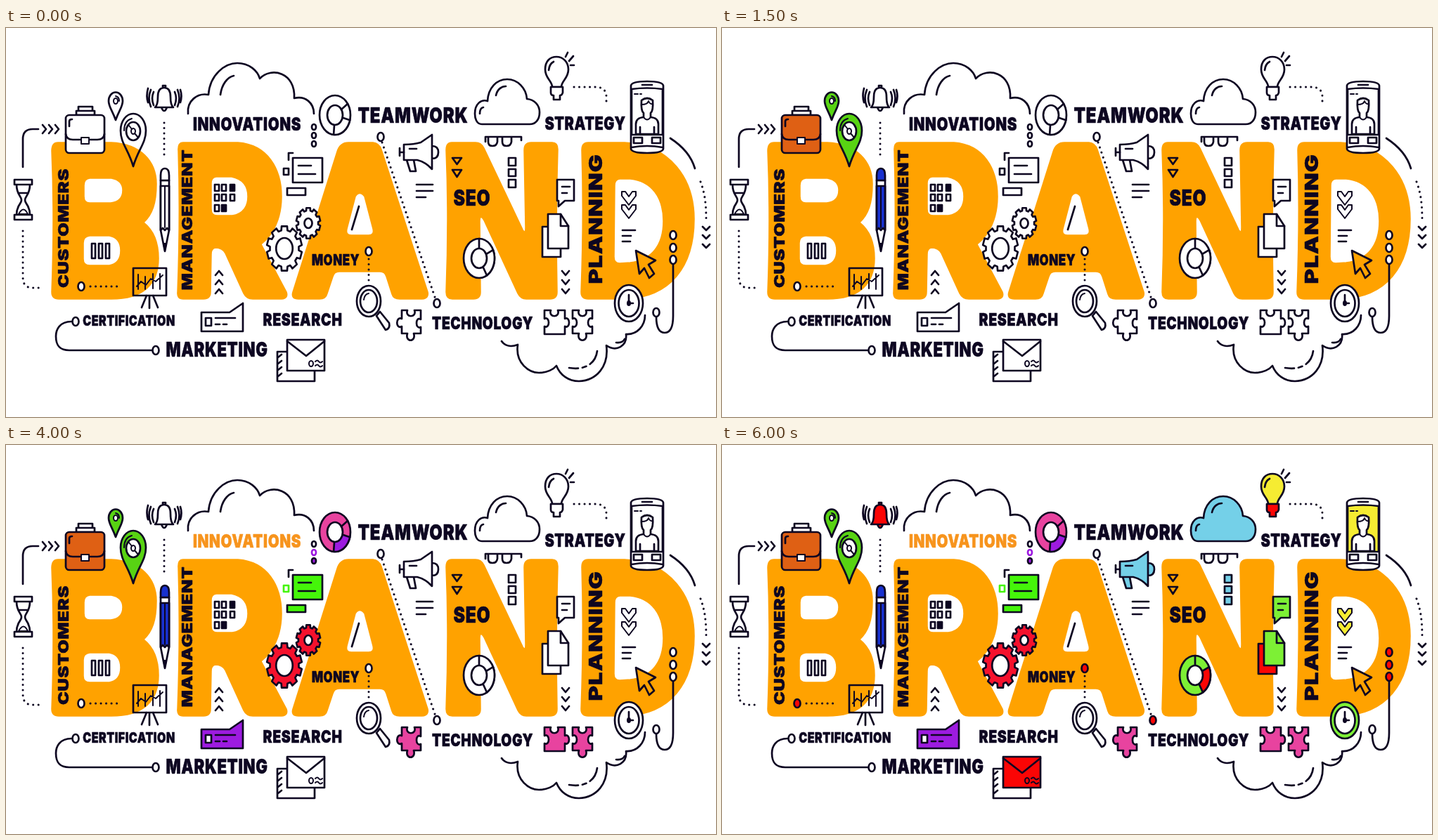
Animation, 1010 px wide and 554 px high, one loop 8 s. Source, as an HTML page:

```html
<!DOCTYPE html>
<html lang="en">
<head>
<meta charset="utf-8">
<title>Brand</title>
<style>
html, body { margin: 0; width: 100%; height: 100%; overflow: hidden; background: #fff; }
svg { display: block; width: 100vw; height: 100vh; color: #0d0621; stroke: currentColor; }
#art { fill: none; stroke-width: 2.7; stroke-linecap: round; stroke-linejoin: round; }
#letters { fill: #ffa200; fill-rule: evenodd; stroke: #ffa200; stroke-width: 1.5; }
.tint, .paper { fill: currentColor; stroke: #0d0621; color: #fff; }
.pin { color: transparent; }
.ink { fill: currentColor; }
.dots { stroke-dasharray: .1 7.4; stroke-width: 3; }
.thin { stroke-width: 2; }
text {
  font-family: Inter, Montserrat, sans-serif; font-weight: 900; letter-spacing: .03em;
  fill: currentColor; stroke-width: .6; text-anchor: middle;
}
</style>
</head>
<body>
<svg viewBox="0 0 1010 554" preserveAspectRatio="none">
<g id="letters">
  <path d="M74 163H150C192 165 214 190 214 222C214 250 208 266 196 277C210 288 217 305 217 328C217 365 195 386 150 386H75Q65 386 65 376Q69 270 65 175Q65 163 74 163ZM119 214Q111 215 111 224V240Q111 249 119 249H149Q166 247 166 231Q166 217 150 214ZM119 296Q110 297 110 306V329Q110 338 119 338H147Q163 335 163 317Q163 299 147 296Z"/>
  <path d="M252 163H330C372 166 392 200 392 240C392 270 381 294 363 308L399 376Q402 385 392 386H351Q342 386 338 378L312 321Q308 313 298 313Q292 314 292 322L291 376Q291 386 281 386H252Q243 386 244 376Q248 270 245 175Q244 163 252 163ZM299 212Q292 213 292 221V258Q292 267 300 267H322C337 265 344 254 344 240C344 225 336 215 321 212Z"/>
  <path d="M487 163H522Q531 164 534 173L600 376Q602 385 592 386H560Q551 386 549 379L541 354Q539 347 532 347H474Q467 347 465 354L457 378Q455 386 446 386H416Q405 386 408 376L471 176Q475 163 487 163ZM497 240Q503 231 510 240L522 286Q524 295 516 295H491Q483 295 485 286Z"/>
  <path d="M634 163H668Q676 163 680 171L735 287Q739 294 739 284L737 174Q737 163 747 163H777Q785 163 785 173Q782 270 784 376Q784 386 774 386H740Q732 386 728 378L680 274Q674 264 674 276L675 376Q675 386 665 386H635Q626 386 626 376Q630 270 626 174Q626 163 634 163Z"/>
  <path d="M828 163H880C945 166 979 215 979 272C979 340 945 384 880 386H828Q818 386 818 376Q822 270 819 174Q819 163 828 163ZM873 215Q866 216 866 224L865 326Q865 335 873 335L888 334C918 330 935 310 935 275C935 241 918 218 888 215Z"/>
</g>
<g id="art">
  <!-- left arrow, hourglass -->
  <path d="M24 198V158Q24 144 38 144H46M52 138l5 6-5 6M61 138l5 6-5 6M70 138l5 6-5 6"/>
  <path class="dots" d="M24 289V355Q24 370 38 370H49"/>
  <path d="M12 216h25v7h-25ZM12 266h25v7h-25ZM15 223C15 238 22 239 22 245S15 252 15 266M34 223C34 238 27 239 27 245S34 252 34 266M19 235h11"/>
  <path class="thin" d="M18 265Q25 252 31 265Z"/>
  <!-- briefcase -->
  <path class="paper" d="M103 118v-6h20v6M100 124v-6h26v6Z"/>
  <rect class="tint case" x="85" y="124" width="55" height="54" rx="5"/>
  <path d="M85 151Q86 159 95 159H130Q139 159 140 151M90 140v-7q0-3 4-3"/>
  <rect class="paper thin" x="107" y="156" width="11" height="9"/>
  <!-- pins -->
  <path class="tint pin" d="M156 131C151 117 146 112 146 104A10 12.5 0 0 1 166 104C166 112 161 117 156 131ZM181 197C174 173 163 164 163 146A18 24 0 0 1 199 146C199 164 188 173 181 197Z"/>
  <ellipse class="paper thin" cx="156" cy="104" rx="3" ry="4"/>
  <path class="thin" d="M156 97q5 1 5 7"/>
  <ellipse class="paper" cx="181" cy="147" rx="10" ry="13"/>
  <ellipse class="thin" cx="181" cy="147" rx="3" ry="4"/>
  <path class="thin" d="M175 139l4 5M183 150l5 6M168 146q0-14 11-17"/>
  <!-- bell -->
  <path class="tint bell" d="M212 113Q216 110 216 98Q216 85 225 85T234 98Q234 110 238 113ZM221 113q4 10 8 0ZM223 85v-3h4v3Z"/>
  <path d="M210 91q-4 9 0 19M206 88q-5 12 0 24M202 86q-3 11 0 20M240 91q4 9 0 19M244 88q5 12 0 24M248 88q3 9 0 18"/>
  <path class="dots" d="M225 135V182"/>
  <!-- pencil -->
  <path class="paper" d="M220 217V288L226 318L232 288V217Z"/>
  <path class="tint pencil" d="M220 217V210Q220 200 226 200T232 210V217ZM220 225h12v63l-3-3-3 3-3-3-3 3Z"/>
  <path class="thin" d="M226 226v58"/>
  <path class="ink thin" d="M224 307h4l-2 10Z"/>
  <!-- open cloud -->
  <path d="M259 122C257 104 272 92 288 95C290 66 312 50 329 50C346 50 358 61 361 72C377 55 412 63 410 100C426 96 438 107 438 122M305 95C307 80 315 70 324 68"/>
  <ellipse cx="438" cy="141" rx="3" ry="4"/>
  <ellipse class="violet" cx="438" cy="153" rx="3" ry="4"/>
  <ellipse class="tint violet" cx="438" cy="165" rx="3" ry="4"/>
  <!-- screens -->
  <path d="M402 188V178H408"/>
  <rect class="screen" x="395" y="200" width="7" height="9"/>
  <path class="tint screen" d="M408 185h42v35h-42ZM400 228h26v10h-26Z"/>
  <path d="M416 196h18M416 208h24"/>
  <!-- grid, bars, chevrons -->
  <path d="M297 223h6v9h-6ZM307 223h6v9h-6ZM297 237h6v9h-6ZM307 237h6v9h-6ZM319 237h6v9h-6ZM297 252h6v9h-6ZM122 307h5v21h-5ZM132 307h5v21h-5ZM142 307h5v21h-5Z"/>
  <path class="ink" d="M319 223h6v9h-6ZM307 252h6v9h-6Z"/>
  <path d="M298 352l5-6 5 6M298 365l5-6 5 6M298 378l5-6 5 6M791 346l5 6 5-6M791 359l5 6 5-6M791 372l5 6 5-6M991 283l5 5 5-5M991 295l5 5 5-5M991 308l5 5 5-5"/>
  <!-- diagonal and A details -->
  <path class="dots" d="M535 163L611 386M516 329V360"/>
  <path d="M502 254L492 287M584 223h23M584 232h23M584 241h13"/>
  <!-- megaphone -->
  <path class="tint sky" d="M570 188l5 16h8l-3-16ZM566 166Q580 166 590 163L606 152V201Q597 191 585 188H566ZM606 168q9 0 9 9t-9 9Z"/>
  <path d="M560 171v11M560 177h6M574 172h10"/>
  <!-- magnifier -->
  <path class="paper" d="M527 410l5-6 13 16q2 8-5 10Z"/>
  <ellipse class="paper" cx="516" cy="389" rx="17" ry="22"/>
  <ellipse cx="516" cy="389" rx="12" ry="16"/>
  <path class="thin" d="M509 387q1-8 7-9"/>
  <!-- N details -->
  <path d="M635 185h13l-6.5 9ZM635 202h13l-6.5 10ZM682 162V155H733V160M686 156v6q0 6 6 6t7-6v-6M706 156v6q0 6 6 6t7-6v-6"/>
  <path class="tint sky" d="M715 185h10v11h-10ZM715 201h10v10h-10ZM715 216h10v11h-10Z"/>
  <!-- closed cloud -->
  <path class="tint sky" d="M677 137C669 137 667 128 667 122C667 108 676 101 685 104C686 85 698 73 713 73S740 86 741 101C752 102 759 110 759 120C759 131 753 137 745 137Z"/>
  <path d="M697 96C699 87 705 83 711 83M674 122q0-8 5-9"/>
  <!-- bulb -->
  <path class="tint glow" d="M777 84C777 75 767 72 767 59C767 47 774 41 783 41S800 48 800 59C800 72 790 75 790 84Z"/>
  <path class="tint red" d="M775 84h17v8q-1 4-4 4v6h-9v-6q-4 0-4-4Z"/>
  <path d="M772 60Q773 51 779 48M796 41l3-6M801 47l6-7M803 53h5"/>
  <path class="dots" d="M808 84H838Q854 84 854 98V109"/>
  <!-- phone -->
  <path class="paper" d="M889 82Q890 76 912 76T935 82V172Q934 178 912 178T889 172Z"/>
  <path class="tint glow" d="M890 87Q912 84 934 87V152H890Z"/>
  <path d="M905 81h14M890 170q22-4 44 0M893 156h12v8h-12ZM919 156h12v8h-12Z"/>
  <path class="thin" d="M894 94h5M902 94h2"/>
  <path class="paper" d="M896 151V137Q896 128 907 127V121Q903 118 904 103Q912 97 920 103Q921 118 917 121V127Q928 128 928 137V151ZM902 151v-10M922 151v-10"/>
  <path class="thin" d="M904 109q9 0 10-5 2 5 6 4M907 127q5 7 10 0"/>
  <path d="M945 157C962 168 975 183 980 200"/>
  <path class="dots" d="M988 219C994 235 996 250 996 274"/>
  <!-- note and documents -->
  <path class="tint leaf" d="M784 216h24v30h-13l-9 8v-8h-2Z"/>
  <path d="M791 226h11M791 235h7"/>
  <path class="tint red" d="M763 283h26v43h-26Z"/>
  <path class="tint leaf" d="M771 265h18l11 17v32h-29Z"/>
  <path d="M789 265v17h11"/>
  <!-- D details -->
  <path class="tint glow thin" d="M876 233h5l5 7 5-7h5v6l-10 13-10-13ZM876 252h5l5 7 5-7h5v6l-10 13-10-13Z"/>
  <path d="M877 288h18M877 296h12M877 304h11"/>
  <path fill="#ffa200" d="M896 317L924 331L914 337L922 350L915 356L908 342L901 350Z"/>
  <path d="M949 335V410Q949 434 937 434T925 411"/>
  <!-- lower cloud -->
  <path d="M705 446C709 452 717 455 728 451C724 478 745 491 758 491C770 491 779 486 783 481C788 494 800 503 815 503C840 502 858 482 854 452C868 462 884 453 882 436C898 437 909 424 909 409"/>
  <path stroke-dasharray="22 6 6 6" d="M841 460C839 476 826 488 801 484M880 443q-3 6-12 5"/>
  <!-- clock -->
  <ellipse class="tint leaf" cx="886" cy="392" rx="20" ry="26"/>
  <ellipse class="paper" cx="886" cy="392" rx="14.5" ry="19"/>
  <path d="M886 380v12h6"/>
  <ellipse class="ink thin" cx="886" cy="392" rx="2" ry="3"/>
  <!-- puzzle -->
  <path class="tint pink" d="M563 402h8c-4 11 14 11 10 0h9v13c-8-5-8 15 0 11v9h-10c4 13-13 13-9 0h-8v-10c-9 5-9-15 0-11ZM766 402h9c-4 11 14 11 10 0h10v12c8-4 8 15 0 11v11h-29v-11c8 4 8-15 0-11ZM806 402h9c-4 11 14 11 10 0h9v12c-8-4-8 15 0 11v10h-9c4 13-14 13-10 0h-9v-10c8 4 8-15 0-11Z"/>
  <!-- speech label -->
  <path class="tint violet" d="M278 405h40l19-13v40h-59Z"/>
  <rect class="paper" x="284" y="413" width="8" height="11"/>
  <path d="M298 413h28M298 422h6M309 422h5"/>
  <!-- board -->
  <path d="M204 381v18M200 381l-7 17M209 381l7 17M181 342h47v39h-47Z"/>
  <path class="thin" d="M186 368l6-7 7 5 7-9 7 4 10-9M188 351v21M198 354v18M209 350v21M219 350v22"/>
  <!-- connector lines -->
  <path class="dots" d="M120 368H163"/>
  <path d="M93 418C76 418 71 430 71 439C71 453 77 459 90 459H207"/>
  <!-- envelopes -->
  <path class="paper" d="M386 461h53v42h-53Z"/>
  <path d="M387 469l5-4M387 478l5-4M387 487l5-4M387 496l5-4"/>
  <path class="tint red" d="M400 444h53v44h-53Z"/>
  <path d="M400 446L427 467L453 446"/>
  <path class="thin" d="M440 475q3-3 5 0t5 0M440 481q3-3 5 0t5 0"/>
  <ellipse class="thin" cx="434" cy="478" rx="3" ry="4"/>
</g>
</svg>
<script>
const art = document.getElementById('art');
const SQUASH = 0.785; // the whole drawing is narrowed by this ratio
const add = markup => art.insertAdjacentHTML('beforeend', markup);

const ring = (x, y, cls = 'paper', rx = 4.5, ry = 6) =>
  add(`<ellipse class="${cls}" cx="${x}" cy="${y}" rx="${rx}" ry="${ry}"/>`);

const polar = (x, y, r, deg) => {
  const a = deg * Math.PI / 180;
  return `${x + r * SQUASH * Math.cos(a)} ${y + r * Math.sin(a)}`;
};

function donut(x, y, r, hole, from, to, main, part, spokes) {
  ring(x, y, 'tint ' + main, r * SQUASH, r);
  add(`<path class="tint ${part}" d="M${x} ${y}L${polar(x, y, r, from)}A${r * SQUASH} ${r} 0 0 1 ${polar(x, y, r, to)}Z"/>`);
  for (const deg of spokes) add(`<path d="M${x} ${y}L${polar(x, y, r, deg)}"/>`);
  ring(x, y, 'paper', hole * SQUASH, hole);
}

function gear(x, y, r, hole, teeth) {
  const pts = [], step = 360 / teeth;
  for (let i = 0; i < teeth; i++)
    for (const [f, k] of [[-.34, .82], [-.25, 1], [.25, 1], [.34, .82]])
      pts.push(polar(x, y, r * k, (i + f) * step - 90));
  add(`<path class="tint gear" d="M${pts.join('L')}Z"/>`);
  ring(x, y, 'paper', hole * SQUASH, hole);
}

function label(word, x, y, size, turn = 0, cls = '') {
  add(`<text class="${cls}" font-size="${size}" transform="translate(${x} ${y}) scale(${SQUASH} 1) rotate(${turn})">${word}</text>`);
}

donut(468, 124, 28, 14, 15, 95, 'pink', 'violet', [-35]);
donut(673, 328, 28, 14, -25, 60, 'leaf', 'red', [-90]);
gear(396, 314, 32, 15, 10);
gear(430, 278, 22, 7, 10);

for (const [x, y] of [[533, 155], [99, 418], [213, 459], [925, 405]]) ring(x, y);
for (const [x, y] of [[107, 368], [516, 318], [613, 392], [949, 295], [949, 313], [949, 330]])
  ring(x, y, 'tint red');

label('INNOVATIONS', 343, 146, 26.2, 0, 'title');
label('TEAMWORK', 579, 135, 30.6);
label('STRATEGY', 824, 145, 25.5);
label('SEO', 663, 253, 31.5);
label('MONEY', 469, 338, 21.5);
label('RESEARCH', 422, 424, 25);
label('MARKETING', 300, 468, 28.2);
label('CERTIFICATION', 175, 424, 20.4);
label('TECHNOLOGY', 678, 429, 24.6);
label('CUSTOMERS', 89, 285, 25.3, -90);
label('MANAGEMENT', 265, 273, 25.2, -90);
label('PLANNING', 848, 272, 33, -90);

// each group takes its colour at a set time and keeps it until the loop ends
const steps = [
  [500, 'case', '#df6014'],
  [1000, 'pin', '#58d313'],
  [1500, 'pencil', '#1830cf'],
  [2000, 'gear', '#f5112d'],
  [2500, 'screen', '#45f50a'],
  [3000, 'violet', '#9d1be0'],
  [3500, 'title', '#f7941d'],
  [4000, 'pink', '#e8439f'],
  [4500, 'sky', '#74d0e8'],
  [5000, 'glow', '#f5ec32'],
  [5500, 'leaf', '#7df035'],
  [6000, 'red', '#fb0505'],
  [6000, 'bell', '#fb0505'],
].map(([at, name, color]) => ({ at, color, parts: [...document.querySelectorAll('.' + name)] }));

function draw() {
  const t = performance.now() % 8000;
  for (const { at, color, parts } of steps)
    for (const part of parts) part.style.color = t >= at ? color : '';
  requestAnimationFrame(draw);
}
draw();
</script>
</body>
</html>
```
